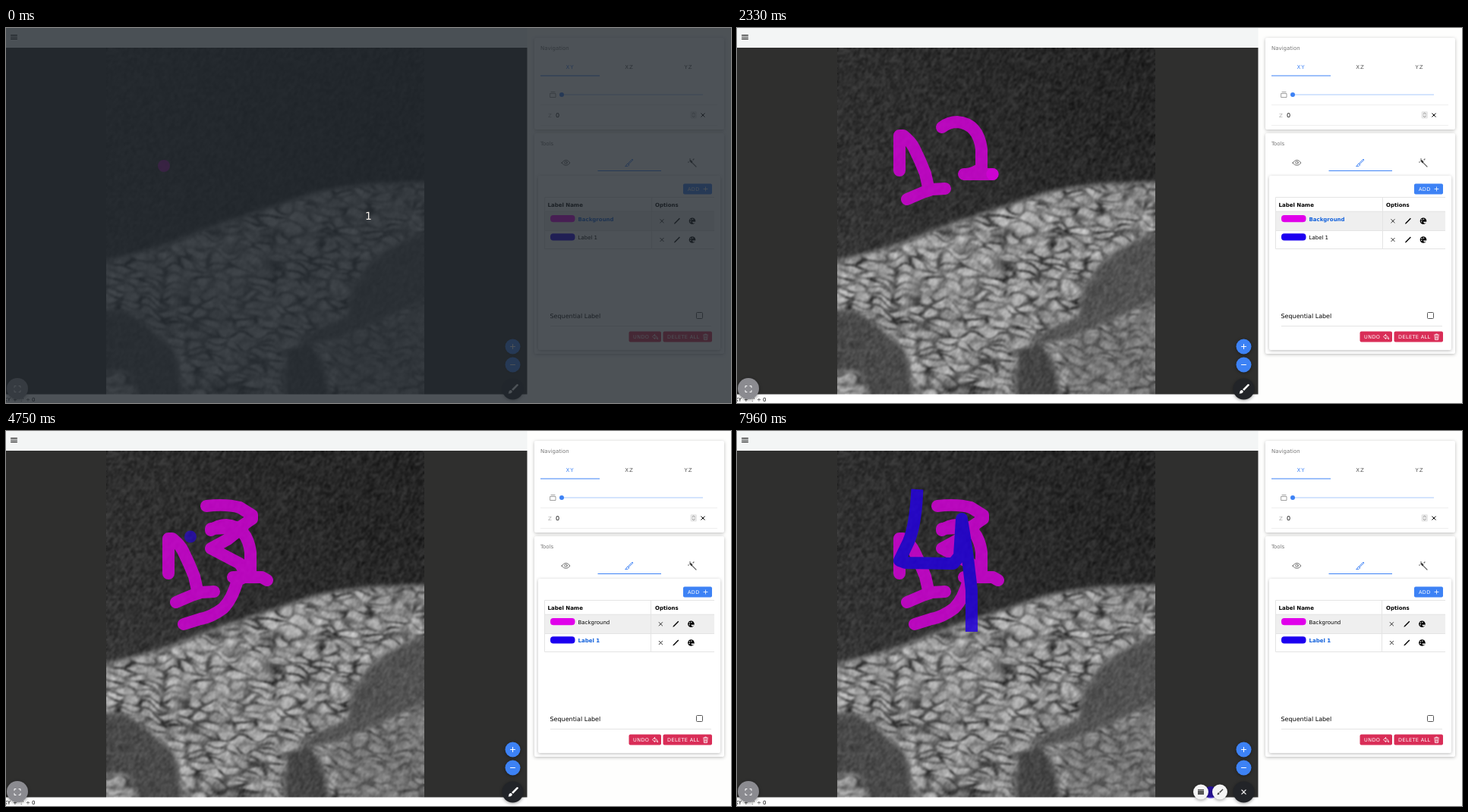
Animation, 955 px wide and 495 px high, one loop 8000 ms. Source, as an HTML page with a canvas:

```html
<!DOCTYPE html>
<html lang="en">
<head>
<meta charset="utf-8">
<title>Label painting</title>
<style>
html, body { margin: 0; width: 100%; height: 100%; overflow: hidden; background: #2f2f2e; }
canvas, svg { position: absolute; left: 0; top: 0; }
canvas { left: 132px; top: 26px; }
text { font: 7px "DejaVu Sans", sans-serif; text-rendering: geometricPrecision; white-space: pre; }
.bold { font-weight: bold; }
.muted { fill: #777; }
.caps { letter-spacing: .06em; }
.small { font-size: 6.5px; fill: #fff; }
.big { font-size: 8px; }
.blue { fill: #3d82f5; }
.red { fill: #d92d57; }
.line { fill: none; stroke: currentColor; stroke-linecap: round; stroke-linejoin: round; }
.rule { stroke: #e4e4e4; fill: none; }
.card { fill: #fff; filter: drop-shadow(0 1px 2px #0004); }
.fab { filter: drop-shadow(0 1px 2px #0006); }
#ink path { fill: none; stroke-width: 16; stroke-linecap: round; stroke-linejoin: round; }
</style>
</head>
<body>
<canvas id="scan" width="419" height="458"></canvas>
<svg width="955" height="495" viewBox="0 0 955 495">
  <defs>
    <path id="brush" d="M-6 6Q-5 5-5 3Q-4 1-2 1.5Q0 3-1 4.5Q-3 6.500-6 6ZM-1.500 .5L5-6Q6-7 7-6T7-4.500L.5 2.200Z"/>
    <path id="cross" class="line" d="M-2.200-2.200L2.200 2.200M2.200-2.200L-2.200 2.200"/>
    <g id="options">
      <use href="#cross" x="864" y="0" stroke-width=".8"/>
      <path d="M880 4L880.500 2.500L886.900-4L887.900-3L881.500 3.500Z"/>
      <circle cx="904" r="4.300"/>
      <g fill="#fff"><circle cx="902" cy="-1.500" r=".8"/><circle cx="904.500" cy="-2.300" r=".8"/><circle cx="901.800" cy="1" r=".8"/><path d="M904 1H908V2.500L905 3Z"/></g>
    </g>
  </defs>

  <rect width="687" height="26" fill="#f3f5f5"/>
  <path class="line" d="M6.500 9.500H14.500M6.500 12H14.500M6.500 14.500H14.500"/>
  <rect y="483.500" width="687" height="12" fill="#fff"/>
  <text y="492.500"><tspan x="-3">XY</tspan><tspan x="9">+ ':'</tspan><tspan x="26">÷ 0</tspan></text>
  <rect x="686.500" width="269" height="495" fill="#fefefd"/>

  <!-- navigation -->
  <rect class="card" x="696" y="13" width="250" height="121" rx="2"/>
  <text class="muted" x="704" y="28.500">Navigation</text>
  <g class="caps" text-anchor="middle">
    <text class="blue" x="743" y="54">XY</text>
    <text x="821" y="54" fill="#555">XZ</text>
    <text x="899" y="54" fill="#555">YZ</text>
  </g>
  <rect class="blue" x="704" y="62.500" width="78" height="1"/>
  <path class="line" color="#888" stroke-width=".8" d="M717 86.500H724V91.500H717ZM718 84.500H723"/>
  <path d="M732 88H918" stroke="#a9c9fb"/>
  <circle class="blue" cx="732" cy="88" r="3"/>
  <path class="rule" d="M704 101.500H937M704 128.500H937" opacity=".6"/>
  <text x="714" y="117.500" fill="#aaa">Z</text>
  <text class="big" x="724" y="118">0</text>
  <rect x="901.500" y="110" width="8.500" height="9.500" rx="1.500" fill="#e8e8e8"/>
  <path class="line" color="#777" stroke-width=".7" d="M904 113.500L905.700 112L907.400 113.500M904 116.200L905.700 117.700L907.400 116.200"/>
  <use href="#cross" x="918" y="115"/>

  <!-- tools -->
  <rect class="card" x="696" y="139" width="250" height="291" rx="2"/>
  <text class="muted" x="704" y="154.500">Tools</text>
  <g class="line" color="#666" stroke-width=".9">
    <path d="M732 178Q737.500 170.500 743 178Q737.500 185 732 178Z"/><circle cx="737.500" cy="177.700" r="1.700"/>
    <path d="M903.500 177.500L909 183M901 173.500V172.500M899.500 177H898.500M905 174L906 173" stroke-width="1.200"/>
  </g>
  <path d="M900 175L902 174L904.500 176.500L903 178.500Z" fill="#333"/>
  <path class="line" color="#3d82f5" stroke-width=".9" d="M816 182.500Q817.500 182 817.500 180Q819 178.300 820.500 179.800Q821 183 816 182.500ZM819.500 178.500L825 173L826 174L820.500 179.500"/>
  <rect class="blue" x="779.500" y="188" width="83.500" height="1"/>
  <rect class="card" x="701" y="195" width="240" height="230" rx="2"/>
  <rect class="blue" x="892" y="205.500" width="38" height="14" rx="2"/>
  <text class="small caps" x="898" y="214.800">ADD</text>
  <path class="line" color="#fff" stroke-width=".8" d="M919 212.500H924M921.500 210V215"/>

  <rect x="709.500" y="242" width="223.500" height="25.500" fill="#efefef"/>
  <path class="rule" d="M933 223.500H709.500V291.500H933M709.500 242.200H933M709.500 267.500H933"/>
  <path class="rule" id="column" d="M850.500 223.500V291.500"/>
  <text class="bold" x="713.500" y="235.500">Label Name</text>
  <text class="bold" x="855" y="235.500">Options</text>
  <rect x="717" y="247" width="32.500" height="9.300" rx="4" fill="#e000ea"/>
  <rect x="717" y="271.300" width="32.500" height="9.300" rx="4" fill="#1c00f0"/>
  <text class="label" x="753.500" y="254.600">Background</text>
  <text class="label" x="753.500" y="279">Label 1</text>
  <g id="icons"><use href="#options" y="254.800"/><use href="#options" y="279.500"/></g>

  <text class="big" x="716.500" y="382.700">Sequential Label</text>
  <rect x="909.500" y="375.500" width="8" height="8" rx="1" fill="#fff" stroke="#555"/>
  <path class="rule" d="M717 393.500H929"/>
  <rect class="red" x="820.500" y="400.500" width="42.500" height="14" rx="2"/>
  <rect class="red" x="865.500" y="400.500" width="64.500" height="14" rx="2"/>
  <text class="small caps" x="826" y="409.900">UNDO</text>
  <text class="small caps" x="871" y="409.900">DELETE ALL</text>
  <g class="line" color="#fff" stroke-width=".8">
    <path d="M854.500 404.500L851.500 407.500L854.500 410.500V408.800Q857 408.500 858.500 411Q858.500 406.500 854.500 406.300Z"/>
    <path d="M918.500 405H924.500M920.500 405V404H922.500V405M919 406L919.500 411.500H923.500L924 406M920.800 407V410M922.200 407V410"/>
  </g>

  <!-- painting -->
  <g id="ink" opacity=".82"></g>
  <circle id="cursor" r="8" opacity=".6"/>

  <!-- floating buttons -->
  <circle class="fab" cx="15" cy="476" r="14" fill="#8b8b90"/>
  <path class="line" color="#fff" d="M11 474.500V472.500H13M17 472.500H19V474.500M19 478.500V480.500H17M13 480.500H11V478.500"/>
  <g class="fab blue"><circle cx="667.500" cy="420.500" r="10"/><circle cx="667.500" cy="444.500" r="10"/></g>
  <path class="line" color="#fff" d="M664.500 420.500H670.500M667.500 417.500V423.500M664.500 444.500H670.500"/>
  <g class="dial"><circle class="fab" r="10" fill="#f4f4f4"/><path d="M-4-3.500H4V3.500H-4Z" fill="#555"/><path d="M-4-2H4" stroke="#bbb" stroke-width=".7"/></g>
  <g class="dial"><circle class="fab" r="10" fill="#f4f4f4"/><use href="#brush" fill="#444" transform="scale(.6)"/></g>
  <circle class="fab" cx="667.500" cy="476.500" r="14" fill="#222428"/>
  <use href="#brush" id="fabBrush" fill="#fff"/>
  <use href="#cross" id="fabCross" color="#fff"/>

  <g id="countdown">
    <rect width="955" height="495" fill="#21272e" opacity=".8"/>
    <text x="477.500" y="253" text-anchor="middle" fill="#f6f1ea" style="font-size:14px">1</text>
  </g>
</svg>
<script>
const $ = id => document.getElementById(id);
const clamp = v => Math.max(0, Math.min(1, v));
const mix = (a, b, k) => a + (b - a) * k;
const smooth = (a, b, v) => { const k = clamp((v - a) / (b - a)); return k * k * (3 - 2 * k); };

function hash(x, y) {
  const s = Math.sin(x * 127.1 + y * 311.7) * 43758.5453;
  return s - Math.floor(s);
}

function noise(x, y) {
  const i = Math.floor(x), j = Math.floor(y), u = smooth(0, 1, x - i), v = smooth(0, 1, y - j);
  return mix(mix(hash(i, j), hash(i + 1, j), u), mix(hash(i, j + 1), hash(i + 1, j + 1), u), v);
}

// Distance to the nearest cell wall of a jittered grid
function wall(x, y) {
  const i = Math.floor(x), j = Math.floor(y);
  let near = 9, next = 9;
  for (let a = i - 1; a <= i + 1; a++) for (let b = j - 1; b <= j + 1; b++) {
    const d = Math.hypot(a + hash(a, b) - x, b + hash(b + 57, a) - y);
    if (d < near) { next = near; near = d; } else if (d < next) next = d;
  }
  return next - near;
}

function drawScan() {
  const c = $("scan").getContext("2d"), w = 419, h = 458;
  const sky = c.createLinearGradient(0, 260, 330, 0);
  sky.addColorStop(0, "#343434");
  sky.addColorStop(1, "#252525");
  c.fillStyle = sky;
  c.fillRect(0, 0, w, h);
  c.translate(-132, -26);
  c.filter = "blur(3px)";
  const region = (gray, d) => { c.fillStyle = `rgb(${gray},${gray},${gray})`; c.fill(new Path2D(d)); };
  region(166, "M110 313L200 290L260 267L330 243L400 220Q450 207 490 206L580 203V500H110Z");
  region(82, "M580 262Q505 280 475 315Q450 345 449 380L400 402L385 420L440 410L500 384L580 345Z");
  region(74, "M110 368L160 374Q190 395 222 425L236 500H180L160 455L110 450Z");
  region(68, "M370 425L400 415L418 440L430 500H365Z");
  region(128, "M425 420L490 392L580 356V500H440Z");
  const image = c.getImageData(0, 0, w, h), px = image.data;
  for (let y = 0, k = 0; y < h; y++) for (let x = 0; x < w; x++, k += 4) {
    const base = px[k], tissue = smooth(85, 160, base);
    const grain = noise((x + y * .45) / 1.8, y / 3.5) - .5;
    let tone = base * mix(1, .85 + .3 * noise(x / 9, y / 7), tissue);
    if (tissue > 0) {
      const wx = x + 12 * noise(x / 22, y / 18), wy = y + 12 * noise(x / 18 + 40, y / 18);
      const gap = wall((wx + wy * .25) / 27, (wy - wx * .2) / 11);
      const depth = mix(.1, .75, noise(x / 15 + 9, y / 9));
      tone *= 1 - tissue * depth * (1 - smooth(0, .5, gap));
    }
    tone += grain * mix(36, 44, tissue) + (hash(x, y) - .5) * 26;
    px[k] = px[k + 1] = px[k + 2] = tone;
  }
  c.putImageData(image, 0, 0);
  c.resetTransform();
  c.filter = "blur(.8px)";
  c.drawImage($("scan"), 0, 0);
}

const magenta = "#d800dd", blue = "#2400e4";
// Pointer legs: start, end, path, ink colour if painting, easing power
const legs = [
  [330, 400, "M208 182L214 188"],
  [400, 800, "M214 188V142L219 142Q229 150 233 158L241 175L248 192L252 210", magenta],
  [800, 900, "M252 210L224 226"],
  [900, 1180, "M224 226L245 217L257 213L274 212", magenta],
  [1180, 1540, "M274 212Q290 185 283 153"],
  [1540, 1700, "M283 153L270 131"],
  [1700, 2365, "M270 131Q279 124 290 124Q318 126 322 160V185Q310 194 299 193L337 193L344 197", magenta],
  [2400, 2790, "M344 197Q300 120 264 99"],
  [2830, 3630, "M264 99Q290 96 308 101L324 111V116L308 127L270 129L312 127L292 143L270 155L308 175L318 191L305 197Q298 222 286 234Q270 246 256 248L234 255", magenta],
  [3640, 3880, "M234 255Q440 230 652 250"],
  [4420, 4750, "M680 250Q420 170 243 140"],
  [4750, 4860, "M243 140L237 85"],
  [4870, 5930, "M237 85Q235 125 226 146L214 171L222 174L285 175L293 165L296 116L303 160L309 210V257", blue, 1.5],
  [6080, 6740, "M309 257Q460 250 614 294"],
  [7130, 7450, "M680 456L667 476"],
  [7720, 7960, "M667 476L624 477"]
].map(([start, end, d, ink, power = 1]) => {
  const path = document.createElementNS("http://www.w3.org/2000/svg", "path");
  path.setAttribute("d", d);
  path.setAttribute("stroke", ink || "none");
  $("ink").append(path);
  const length = path.getTotalLength();
  path.style.strokeDasharray = `${length} ${length + 40}`;
  return { start, end, ink, power, path, length };
});
const labels = document.querySelectorAll(".label"), dial = document.querySelectorAll(".dial");
const show = (el, on) => el.style.visibility = on ? "visible" : "hidden";
const place = (el, x, y, scale, turn = 0) =>
  el.setAttribute("transform", `translate(${x} ${y}) rotate(${turn}) scale(${scale})`);

function render(t) {
  show($("countdown"), t < 40);

  let leg = legs[0];
  for (const l of legs) {
    l.done = clamp((t - l.start) / (l.end - l.start)) ** l.power * l.length;
    if (t >= l.start) leg = l;
    show(l.path, t > l.start);
    l.path.style.strokeDashoffset = l.length - l.done;
    if (l.ink === blue) l.path.style.strokeLinecap = t < 6080 ? "round" : "square";
  }
  const tip = leg.path.getPointAtLength(leg.done);
  place($("cursor"), tip.x, tip.y, 1);
  show($("cursor"), !(t > 3880 && t < 4420 || t > 6750 && t < 7130));

  const second = t >= 4250;
  $("cursor").setAttribute("fill", second ? blue : magenta);
  labels.forEach((label, i) => {
    const active = i === +second;
    label.style.fontWeight = active ? "bold" : "normal";
    label.style.fill = active ? "#1060dc" : "#000";
  });
  place($("icons"), second ? -1.6 : 0, 0, 1);
  place($("column"), second ? -1 : 0, 0, 1);

  const open = smooth(7500, 7800, t);
  dial.forEach((button, i) => { place(button, 611 + 25 * i, 476.5, open); show(button, open > 0); });
  place($("fabBrush"), 667.5, 476.5, 1 - open, open * 90);
  place($("fabCross"), 667.5, 476.5, open * 1.2, (open - 1) * 90);
}

drawScan();
const began = performance.now();
(function tick() {
  render((performance.now() - began) % 8000);
  requestAnimationFrame(tick);
})();
</script>
</body>
</html>
```
